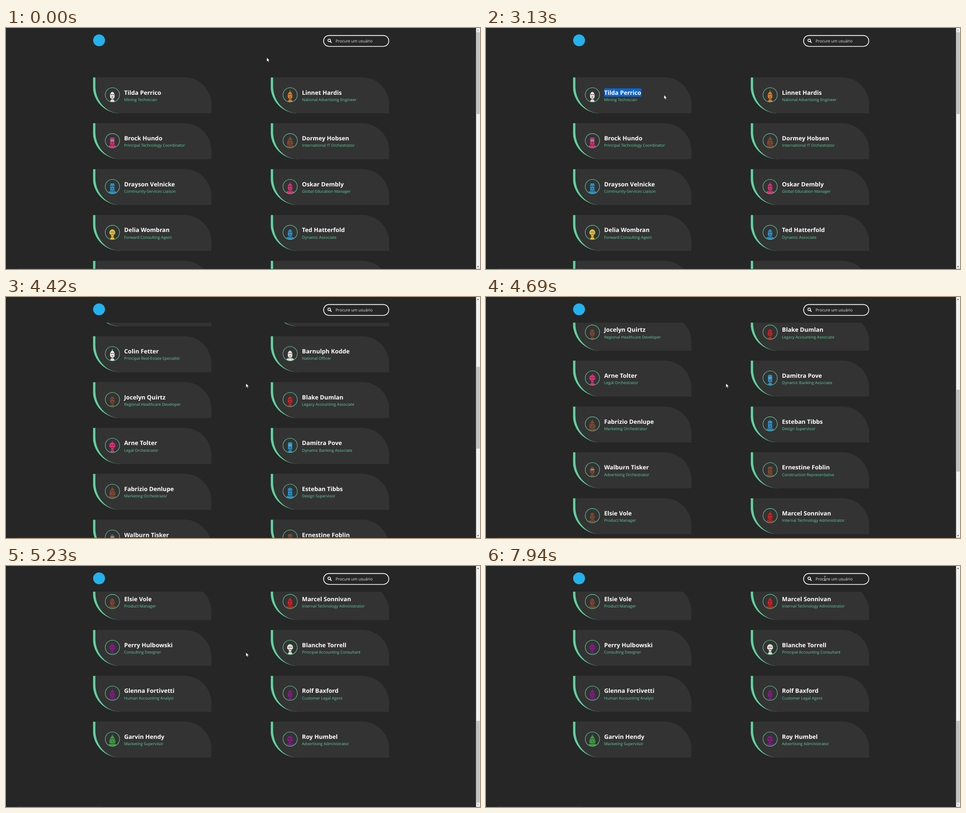
Recreate the animation shown at these times as an HTML page. Size 1049 px wide and 534 px high, loop 8 s.

```html
<!DOCTYPE html>
<html lang="pt-BR">
<head>
<meta charset="utf-8">
<title>Usuários</title>
<style>
  html, body { margin: 0; width: 100%; height: 100%; overflow: hidden; background: #262626; }
  /* Laid out as a 1920px wide page, shown at stage size */
  #page {
    position: absolute; left: 0; top: 0; width: 1920px; height: 977.4px; overflow: hidden;
    transform: scale(.546354); transform-origin: 0 0;
    background: #262626; color: #fff; font: 16px "Open Sans", sans-serif;
    text-rendering: geometricPrecision;
  }
  #page *, #page { box-sizing: border-box; }
  #page div, #page span.sub, #page svg { position: absolute; }
  #list { left: 0; top: 0; }
  .card {
    width: 480px; height: 146px; background: #333;
    border-left: 10px solid #5dd39e; border-radius: 0 110px 0 110px;
  }
  .card svg {
    left: 39px; top: 40.5px; width: 60px; height: 60px;
    border: 2px solid #5dd39e; border-radius: 50%; overflow: hidden;
  }
  .name { left: 117px; top: 45px; font-size: 24px; font-weight: 700; line-height: 33px; white-space: nowrap; }
  .name span { background: linear-gradient(#0a66d8, #0a66d8) 0 0 / 0 100% no-repeat; }
  .sub { left: 117px; top: 79px; line-height: 22px; color: #5dd39e; white-space: nowrap; }
  #head { left: 0; top: 0; width: 1903px; height: 104px; background: #262626; }
  #logo { left: 353px; top: 26px; width: 48px; height: 48px; border-radius: 50%; background: #22b3ee; }
  #search { left: 1285px; top: 28.5px; width: 267px; height: 47px; border: 3px solid #fff; border-radius: 24px; }
  #hint { left: 1335px; top: 41px; font-size: 16.3px; line-height: 22px; color: #e6e6e6; white-space: nowrap; }
  #lens { left: 1302px; top: 43px; }
  #bar { left: 1904px; top: 0; width: 16px; height: 978px; background: #f1f1f1; }
  #thumb { left: 1px; width: 14px; background: #c1c1c1; }
  .arrow { left: 4px; border: 4px solid transparent; }
  #up { top: 3px; border-bottom: 5px solid; }
  #down { bottom: 3px; border-top: 5px solid; }
  #strip { left: 46px; bottom: 0; width: 344px; height: 1.8px; background: #5c5c5c; }
  #cursor { left: 0; top: 0; overflow: visible; }
</style>
</head>
<body>
<div id="page">
  <div id="list"></div>
  <div id="head">
    <div id="logo"></div>
    <div id="search"></div>
    <svg id="lens" width="18" height="18" fill="none" stroke="#fff" stroke-width="3">
      <circle cx="7" cy="7" r="5.3"/><path d="M11 11L16.4 16.4" stroke-width="3.6"/>
    </svg>
    <div id="hint">Procure um usuário</div>
  </div>
  <div id="strip"></div>
  <div id="bar">
    <div id="thumb"></div>
    <div id="up" class="arrow"></div>
    <div id="down" class="arrow"></div>
  </div>
  <svg id="cursor" width="14" height="22">
    <path id="pointer" d="M0 0V16.5L4 13L6.6 19.3L9.4 18L6.7 12H12Z" fill="#fff" stroke="#111"/>
    <path id="beam" d="M-4 -8.5H4M0 -8.5V8.5M-4 8.5H4" fill="none" stroke="#ccc" stroke-width="1.5"/>
  </svg>
</div>
<script>
const SCALE = .546354, LOOP = 8000, PITCH = 186, TOP = 200, LEFT = 351.5, COLUMN = 720.5, MAX = 1801;
const $ = id => document.getElementById(id);

const ink = {
  white: '#e9e5e0', orange: '#d98029', pink: '#dc2f78', brown: '#7a4a33', blue: '#2a90c9',
  yellow: '#efc022', red: '#c92323', purple: '#7d1f80', green: '#409a43'
};
const heads = {
  egg: 'M19 35C19 7 41 7 41 35Q41 46 30 46Q19 46 19 35Z',
  cone: 'M30 9C36 16 46 31 44 46H16C14 31 24 16 30 9Z',
  box: 'M20 18Q20 13 25 13H35Q40 13 40 18V46H20Z',
  dome: 'M16 30C16 8 44 8 44 30Q44 38 36 38V47H24V38Q16 38 16 30Z'
};
const people = [
  'Tilda Perrico|Mining Technician|white egg slim',
  'Linnet Hardis|National Advertising Engineer|orange egg slim spike',
  'Brock Hundo|Principal Technology Coordinator|pink box wide visor',
  'Dormey Hobsen|International IT Orchestrator|brown cone wide spike',
  'Drayson Velnicke|Community-Services Liaison|blue box wide',
  'Oskar Dembly|Global Education Manager|pink egg wide spike',
  'Delia Wombran|Forward Consulting Agent|yellow dome slim visor',
  'Ted Hatterfold|Dynamic Associate|blue egg wide',
  'Colin Fetter|Principal Real-Estate Specialist|white egg slim spike',
  'Barnulph Kodde|National Officer|white egg wide',
  'Jocelyn Quirtz|Regional Healthcare Developer|brown egg slim',
  'Blake Dumlan|Legacy Accounting Associate|red egg slim',
  'Arne Tolter|Legal Orchestrator|pink dome slim spike',
  'Damitra Pove|Dynamic Banking Associate|blue box slim visor',
  'Fabrizio Denlupe|Marketing Orchestrator|brown cone wide spike',
  'Esteban Tibbs|Design Supervisor|blue box wide spike',
  'Walburn Tisker|Advertising Orchestrator|brown egg slim visor',
  'Ernestine Foblin|Construction Representative|brown box wide',
  'Elsie Vole|Product Manager|brown egg wide',
  'Marcel Sonnivan|Internal Technology Administrator|red egg wide spike',
  'Perry Hulbowski|Consulting Designer|purple dome slim spike',
  'Blanche Torrell|Principal Accounting Consultant|white dome slim visor',
  'Glenna Fortivetti|Human Accounting Analyst|purple egg wide spike',
  'Rolf Baxford|Customer Legal Agent|purple egg slim',
  'Garvin Hendy|Marketing Supervisor|green cone wide spike',
  'Roy Humbel|Advertising Administrator|purple dome wide'
];

function avatar(look) {
  const [color, head, body, extra] = look.split(' ');
  const eyes = extra === 'visor'
    ? '<rect x="21" y="24" width="18" height="6" rx="3" fill="#7fa0a5"/>'
    : '<circle cx="26" cy="27" r="2.2"/><circle cx="34" cy="27" r="2.2"/>';
  const spike = extra === 'spike' ? `<path d="M28 16L30 3L32 16Z" fill="${ink[color]}"/>` : '';
  return `<svg viewBox="2 2 56 56"><g fill="#2a2022">
    <ellipse cx="30" cy="60" rx="${body === 'wide' ? 18 : 9}" ry="14" fill="${ink[color]}"/>
    <path d="M21 50Q30 45 39 50V53Q30 48 21 53Z" opacity=".4"/>
    <g transform="translate(4 6) scale(.86)">${spike}
      <path d="${heads[head]}" fill="${ink[color]}"/>
      <path d="M35 14Q46 30 37 45Q41 30 35 14Z" opacity=".25"/>
      ${eyes}<rect x="26" y="37" width="8" height="2.5" rx="1"/>
    </g></g></svg>`;
}

$('list').innerHTML = people.map((line, i) => {
  const [name, job, look] = line.split('|');
  return `<div class="card" style="left:${LEFT + i % 2 * COLUMN}px;top:${TOP + (i >> 1) * PITCH}px">
    ${avatar(look)}<div class="name"><span>${name}</span></div><span class="sub">${job}</span></div>`;
}).join('');
const firstName = document.querySelector('.name span');

// Moves happen from first to last ms; sway bends the straight way, turns counts half waves sideways
const mouse = [
  { first: 80, last: 150, to: [568.5, 69] },
  { first: 350, last: 420, to: [563.5, 69] },
  { first: 690, last: 1460, to: [420, 300], sway: [-365, 200], turns: 2 },
  { first: 1530, last: 2290, to: [270, 145], sway: [300, 230] },
  { first: 2360, last: 3130, to: [394, 148.5] },
  { first: 3190, last: 3600, to: [547, 162] },
  { first: 3800, last: 3870, to: [531, 191.5] },
  { first: 5560, last: 6400, to: [256, 376.5], sway: [-100, 110] },
  { first: 6470, last: 7170, to: [306, 374] },
  { first: 7240, last: 7940, to: [750, 27.5] }
];
const wheel = [
  { first: 3800, last: 4490, to: 800 },
  { first: 4620, last: 4830, to: 1300 },
  { first: 5030, last: 5230, to: MAX }
];

const mix = (a, b, k) => a + (b - a) * k;
const scrollEase = k => 1 - (1 - k ** 1.9) ** 2.33;

// The screen refreshed about every 70 ms, so motion advances in steps
function progress({ first, last }, t) {
  if (t < first) return 0;
  const gaps = Math.round((last - first) / 73);
  const step = Math.floor((t - first) / (last - first) * gaps + 1e-6) + 1;
  return Math.min(1, step / (gaps + 1));
}

function scrollAt(t) {
  return wheel.reduce((y, m) => mix(y, m.to, scrollEase(progress(m, t))), 0);
}

function mouseAt(t) {
  return mouse.reduce(([x, y], m) => {
    const k = progress(m, t), [sx, sy] = m.sway || [0, 0];
    return [
      mix(x, m.to[0], k) + sx * Math.sin(Math.PI * (m.turns || 1) * k),
      mix(y, m.to[1], k) + sy * Math.sin(Math.PI * k)
    ];
  }, [577, 65.5]);
}

function overText(x, y, scroll) {
  if (y < 104) return x > 1328 && x < 1530 && y > 30 && y < 74;
  const col = (x - LEFT) % COLUMN, row = (y + scroll - TOP) % PITCH;
  return col > 125 && col < 278 && row > 44 && row < 101;
}

function draw(t) {
  const scroll = scrollAt(t);
  const [x, y] = mouseAt(t).map(v => v / SCALE);

  $('list').style.transform = `translateY(${-scroll}px)`;
  const size = 943 * 977 / 2778;
  $('thumb').style.height = size + 'px';
  $('thumb').style.top = 17 + scroll / MAX * (943 - size) + 'px';
  $('up').style.borderBottomColor = scroll > 0 ? '#505050' : '#a3a3a3';
  $('down').style.borderTopColor = scroll < MAX ? '#505050' : '#a3a3a3';

  const picked = t >= 2430 && t < 3390;
  firstName.style.backgroundSize = `${picked ? Math.max(0, x - LEFT - 127) : 0}px 100%`;

  const text = overText(x, y, scroll);
  $('pointer').style.display = text ? 'none' : '';
  $('beam').style.display = text ? '' : 'none';
  $('cursor').style.transform = `translate(${x}px, ${y}px)`;
}

const begin = performance.now();
function tick() {
  draw((performance.now() - begin) % LOOP);
  requestAnimationFrame(tick);
}
tick();
</script>
</body>
</html>
```
